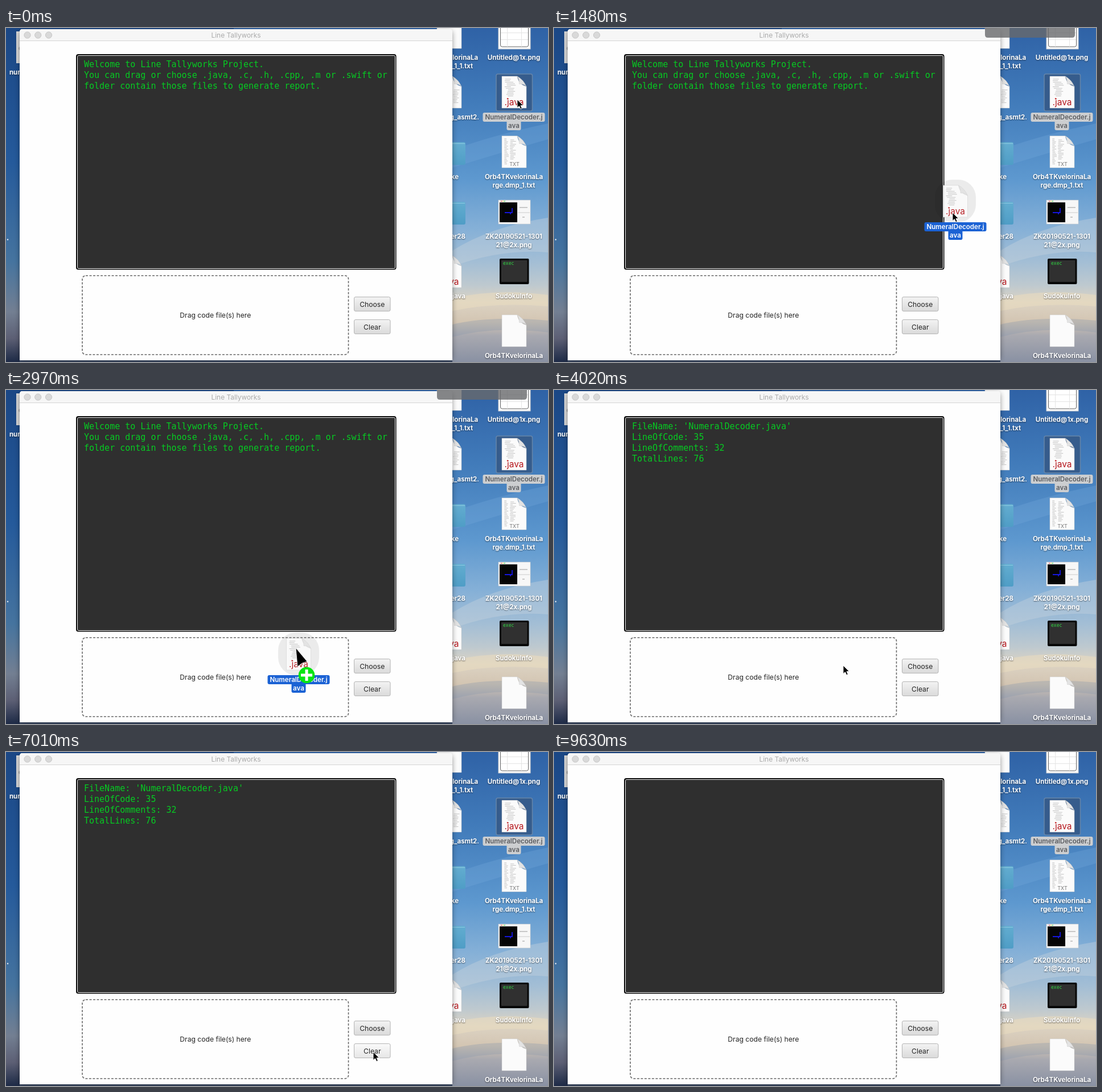
Write an HTML page that moves like this. It is 952x588 px and loops after 9.7 s.

```html
<!DOCTYPE html>
<html lang="en">
<head>
<meta charset="utf-8">
<title>Line Tallyworks</title>
<style>
html, body { margin: 0; width: 100%; height: 100%; overflow: hidden; background: #2c5f9f; }
svg { display: block; width: 952px; height: 588px; }
text { font-family: Inter, "Open Sans", sans-serif; white-space: pre; }
.label { font-size: 11.6px; font-weight: 600; fill: #fff; }
.ui { font-size: 12.15px; fill: #252525; text-anchor: middle; }
.mid { text-anchor: middle; }
.end { text-anchor: end; }
.console text { font: 15px "DejaVu Sans Mono", monospace; fill: #06cb22; }
</style>
</head>
<body>
<svg id="stage" viewBox="0 0 952 588">
  <defs>
    <linearGradient id="sky" x2="0" y2="1">
      <stop offset="0" stop-color="#2f62a6"/>
      <stop offset=".22" stop-color="#417bba"/>
      <stop offset=".45" stop-color="#5d98cf"/>
      <stop offset=".6" stop-color="#85b0d7"/>
      <stop offset=".7" stop-color="#a3bed5"/>
      <stop offset=".77" stop-color="#bec9cf"/>
      <stop offset=".82" stop-color="#dcd3c3"/>
      <stop offset=".88" stop-color="#d3c5b2"/>
      <stop offset=".92" stop-color="#a9a9b0"/>
      <stop offset="1" stop-color="#8991a3"/>
    </linearGradient>
    <linearGradient id="dusk" x2="0" y2="1">
      <stop offset="0" stop-color="#1b4785"/>
      <stop offset=".4" stop-color="#255a9b"/>
      <stop offset=".7" stop-color="#46749f"/>
      <stop offset=".85" stop-color="#737f92"/>
      <stop offset=".93" stop-color="#5c5f74"/>
      <stop offset="1" stop-color="#1d2a46"/>
    </linearGradient>
    <linearGradient id="bar" x2="0" y2="1">
      <stop offset="0" stop-color="#eaeaea"/><stop offset="1" stop-color="#d2d2d2"/>
    </linearGradient>
    <linearGradient id="btn" x2="0" y2="1">
      <stop offset="0" stop-color="#f3f3f3"/><stop offset="1" stop-color="#dadada"/>
    </linearGradient>
    <linearGradient id="btnHover" x2="0" y2="1">
      <stop offset="0" stop-color="#fafafa"/><stop offset="1" stop-color="#e6e6e6"/>
    </linearGradient>
    <linearGradient id="folder" x2="0" y2="1">
      <stop offset="0" stop-color="#63add0"/><stop offset="1" stop-color="#4f9dc6"/>
    </linearGradient>
    <filter id="soft" x="-20%" y="-20%" width="140%" height="140%"><feGaussianBlur stdDeviation="5"/></filter>
    <filter id="shade" x="-10%" y="-10%" width="120%" height="120%">
      <feDropShadow dx="0" dy="1" stdDeviation="1" flood-color="#001" flood-opacity=".65"/>
    </filter>
  </defs>
  <g id="desktop"></g>
  <g id="window"></g>
  <g id="overlay"></g>
</svg>
<script>
const LOOP = 9700, STEP = 149, START = 280;
const el = id => document.getElementById(id);
const lerp = (a, b, k) => a + (b - a) * k;

const rect = (x, y, w, h, fill, rx = 0, more = '') =>
  `<rect x="${x}" y="${y}" width="${w}" height="${h}" rx="${rx}" fill="${fill}" ${more}/>`;
const text = (s, x, y, cls, more = '') => `<text class="${cls}" x="${x}" y="${y}" ${more}>${s}</text>`;
const path = (d, fill, more = '') => `<path d="${d}" fill="${fill}" ${more}/>`;
const label = (lines, cx, y) => lines.map((s, i) => text(s, cx, y + i * 15, 'label mid')).join('');

function random(seed) {
  return () => (seed = seed * 16807 % 2147483647) / 2147483647;
}

// Faint rows of print on a document
function smallPrint(x, y, rows, gap, indent, length, seed) {
  const rnd = random(seed * 99991);
  let d = '';
  for (let i = 0; i < rows; i++) {
    const left = x + rnd() * indent, width = length * (0.4 + 0.6 * rnd());
    d += `M${left.toFixed(1)} ${(y + i * gap).toFixed(1)}h${width.toFixed(1)}`;
  }
  return path(d, 'none', 'stroke="#b3b3b3" stroke-width=".8"');
}

function sheet(x, y, inner = '') {
  return `<g transform="translate(${x} ${y})">` +
    path('M0 0H27Q29 14 43 18V56H0Z', '#fbfbfb', 'stroke="#c9c9c9" stroke-width=".5"') + inner +
    path('M27 0Q38 6 43 18Q39 13 30.500 13.500Q31 6 27 0Z', '#e3e3e3', 'stroke="#c4c4c4" stroke-width=".4"') + '</g>';
}

const suffix = text('.java', 21.5, 50.5, 'mid', 'font-size="15.500" fill="#b5161c"');

const javaSheet = (x, y) => sheet(x, y, smallPrint(5, 5, 12, 2.7, 6, 16, 41) +
  '<circle cx="10" cy="39.500" r="1.200" fill="#c33"/>' + suffix);

const txtSheet = (x, y) => sheet(x, y, smallPrint(4, 5, 18, 2.6, 0.5, 8, 7) + smallPrint(14, 7, 14, 2.6, 1, 11, 19) +
  text('TXT', 22, 52.5, 'mid', 'font-size="9" fill="#777"'));

// File name on coloured tags, below a sheet centred on cx
function tags(cx, y, back, ink) {
  return rect(cx - 54.5, y, 109, 16, back, 3) + rect(cx - 12.5, y + 14, 25, 17, back, 3) +
    text('NumeralDecoder.j', cx, y + 12, 'label mid', `style="fill:${ink}"`) +
    text('ava', cx, y + 27, 'label mid', `style="fill:${ink}"`);
}

const folder = y => path(`M750 ${y}H804Q807 ${y} 807 ${y + 3}V${y + 37}Q807 ${y + 40} 804 ${y + 40}H750Z`, 'url(#folder)') +
  rect(750, y + 2, 56, 1, '#8cc9e2');

function drawDesktop() {
  const clouds =
    path('M784 215Q850 190 952 168V196Q860 222 784 246Z', '#74a9da', 'opacity=".3"') +
    path('M784 392Q850 350 952 334V395Q870 388 784 420Z', '#c5d3dc', 'opacity=".4"') +
    path('M784 476Q860 458 952 470V490Q860 482 784 498Z', '#eadcc0', 'opacity=".6"') +
    path('M784 522Q850 506 952 515V536Q860 524 784 544Z', '#8b97ab', 'opacity=".35"');
  const icons =
    // right column
    rect(865, -12, 56, 49, '#fafafa', 0, 'stroke="#d5d5d5"') +
    rect(868.5, -8, 49, 41, '#fff', 3, 'stroke="#666"') +
    path('M869 8.500H917M869 20.500H917M880.500 0V33M905.500 0V33', 'none', 'stroke="#e4e4e4"') +
    rect(861, 81, 63.5, 65, '#365c8c', 3, 'stroke="#6685a9" stroke-width="1.500"') +
    javaSheet(871, 85) + txtSheet(871, 190) +
    rect(865, 303, 56, 42, '#f7f7f7', 0, 'stroke="#ccc" stroke-width=".6"') +
    rect(867, 307, 31, 35, '#050505') +
    path('M876 325H889V317M886 325V328', 'none', 'stroke="#1616df" stroke-width="1.800"') +
    path('M899 325H920', 'none', 'stroke="#ccc"') +
    path('M902 316H916M907 333H911', 'none', 'stroke="#999" stroke-width="1.200"') +
    '<circle cx="870" cy="305" r="1" fill="#f55"/><circle cx="873" cy="305" r="1" fill="#fb4"/><circle cx="876" cy="305" r="1" fill="#4c5"/>' +
    rect(867, 406, 51.5, 45, '#070707', 2) + rect(870, 409, 45.5, 38, '#303030', 1) +
    text('exec', 873, 417, '', 'style="font:8px \'DejaVu Sans Mono\',monospace" fill="#31d843"') +
    sheet(871, 505) +
    // column behind the window
    sheet(757, -20) + sheet(757, 85, smallPrint(28, 24, 9, 2.8, 2, 10, 5)) + folder(201) + folder(306) +
    sheet(757, 401, suffix) +
    rect(18, 6, 30, 56, '#d9d9d9') + '<circle cx="25" cy="36" r="3" fill="#aaa"/>';
  const names =
    label(['Untitled@1x.png'], 892, 56) +
    label(['Orb4TKvelorinaLa', 'rge.dmp_1.txt'], 892, 266) +
    label(['ZK20190521-1301', '21@2x.png'], 892, 371) +
    label(['SudokuInfo'], 892, 476) +
    label(['Orb4TKvelorinaLa'], 892, 581) +
    label(['Orb4TKvelorinaLa', 'rge.dmp_1_1.txt'], 778, 56) +
    text('prog_asmt2.', 831, 161, 'label end') +
    text('lake', 795, 266, 'label end') +
    text('folder28', 807, 371, 'label end') +
    text('main.java', 807, 476, 'label end') +
    text('numer', 6, 82, 'label');
  el('desktop').innerHTML =
    rect(0, 0, 952, 588, 'url(#sky)') + clouds + rect(0, 0, 400, 588, 'url(#dusk)') +
    rect(24, 584, 760, 4, '#3c4a64') + '<circle cx="3" cy="372.500" r="1.200" fill="#e8eef6"/>' +
    icons + `<g filter="url(#shade)">${names}</g>` + tags(892, 149, '#ccced0', '#5b5d61');
}

const button = (id, name, y) =>
  rect(611.5, y, 63.5, 25, 'url(#btn)', 2.5, `id="${id}" stroke="#b4b4b4"`) + text(name, 643.3, y + 17, 'ui');

function drawWindow() {
  const lights = [37.5, 56.2, 75].map(x => `<circle class="light" cx="${x}" cy="12.500" r="5.600"/>`).join('');
  el('window').innerHTML =
    rect(24, 5, 760, 580, '#000', 5, 'opacity=".4" filter="url(#soft)"') +
    path('M24 585V7Q24 2 29 2H779Q784 2 784 7V585Z', '#fefefe') +
    path('M24 22V7Q24 2 29 2H779Q784 2 784 7V22Z', '#f6f6f6', 'id="titleBar"') +
    rect(24, 22, 760, 1, '#d5d5d5', 0, 'id="titleLine"') + lights +
    text('Line Tallyworks', 404, 17, 'mid', 'id="title" font-size="11.900"') +
    rect(123, 46, 562.5, 379.5, '#050505', 4) +
    rect(125.5, 48.5, 558, 375, '#2f2f2f', 2, 'stroke="#f4f4f4"') +
    '<g class="console" id="console"></g>' +
    rect(134, 436, 467.5, 139, 'none', 6, 'stroke="#686868" stroke-width="1.600" stroke-dasharray="4 2.500"') +
    text('Drag code file(s) here', 367.8, 510.3, 'ui') +
    button('choose', 'Choose', 473.5) + button('clear', 'Clear', 513.5);
}

function drawOverlay() {
  const halo = rect(-36, -10, 72, 75, '#000', 31, 'opacity=".075"');
  el('overlay').innerHTML =
    path('M757 0H915V12Q915 17 910 17H762Q757 17 757 12Z', '#68696c', 'id="notch" opacity=".8"') +
    `<g id="ghost">${halo}<g opacity=".93">${javaSheet(-21.5, 0)}</g>${tags(0, 65, '#1b62d4', '#fff')}</g>` +
    `<g id="arrow">${path('M0 0V14.500L3.400 11.400L5.800 16.700L8.300 15.600L6 10.500H10.500Z', '#000', 'stroke="#fff" stroke-width=".9"')}</g>` +
    `<g id="copy">${path('M0 -31L20 -7L11 -4L3 2Z', '#000', 'stroke="#fff" stroke-width=".8"')}
      <circle cx="19" cy="17" r="14.300" fill="#08e512"/>
      ${path('M9 17H29M19 7V27', 'none', 'stroke="#fff" stroke-width="5"')}</g>`;
}

// Drag route: step, x, y
const drag = [[-1, 898, 126], [0, 893, 131], [7, 733, 299], [8, 700, 325], [12, 577, 406],
  [15, 532, 446], [18, 509, 485], [20, 504, 489]];
// Pointer after the drop: time, x, y
const moves = [[3870, 505, 486], [4020, 508, 485], [4170, 511, 483], [4320, 514, 482],
  [5510, 615, 501], [5660, 655, 512], [5810, 695, 523], [5960, 719, 528],
  [6710, 697, 528], [6860, 668, 528], [7010, 645, 528], [8190, 730, 530]];

function dragPoint(step) {
  let i = 1;
  while (i < drag.length - 1 && drag[i][0] < step) i++;
  const [s0, x0, y0] = drag[i - 1], [s1, x1, y1] = drag[i];
  const k = Math.min(1, (step - s0) / (s1 - s0));
  return [lerp(x0, x1, k), lerp(y0, y1, k)];
}

const welcome = ['Welcome to Line Tallyworks Project.',
  'You can drag or choose .java, .c, .h, .cpp, .m or .swift or',
  'folder contain those files to generate report.'];
const report = ["FileName: 'NumeralDecoder.java'", 'LineOfCode: 35', 'LineOfComments: 32', 'TotalLines: 76'];
const blank = [];

let shown = null;
function write(lines) {
  if (lines === shown) return;
  shown = lines;
  el('console').innerHTML = lines.map((s, i) => text(s, 137, 69.3 + i * 18.75, '')).join('');
}

const set = (id, name, value) => el(id).setAttribute(name, value);
const show = (id, on) => set(id, 'visibility', on ? 'visible' : 'hidden');
const place = (id, [x, y]) => set(id, 'transform', `translate(${x.toFixed(1)} ${y.toFixed(1)})`);

function render(t) {
  const step = t < 290 ? -1 : Math.floor((t - START) / STEP);
  const dropped = t >= 3870, active = t >= 7750 && t < 9630;
  const dragging = step >= 1 && !dropped, copying = dragging && step >= 16;
  const pos = dropped ? moves.filter(m => m[0] <= t).pop().slice(1) : dragPoint(Math.min(step, 20));

  place('arrow', pos);
  place('copy', pos);
  place('ghost', [pos[0] + 5, pos[1] - 48]);
  show('arrow', !copying && t < 8340);
  show('copy', copying);
  show('ghost', dragging);
  show('notch', step >= 2 && !dropped);

  write(!dropped ? welcome : t < 7900 ? report : blank);

  const hover = t >= 6860 && t < 8190, pressed = t >= 7750 && t < 7900;
  set('clear', 'fill', pressed ? '#d3d3d3' : hover ? 'url(#btnHover)' : 'url(#btn)');
  set('clear', 'stroke', active ? '#159fd2' : '#b4b4b4');
  set('clear', 'stroke-width', active ? 1.6 : 1);

  set('titleBar', 'fill', active ? 'url(#bar)' : '#f6f6f6');
  set('titleLine', 'fill', active ? '#b3b3b3' : '#d5d5d5');
  set('title', 'fill', active ? '#3f3f3f' : '#ababab');
  const hues = active ? ['#fc5650', '#fdbb2e', '#2bc63f'] : ['#d9d9d9', '#d9d9d9', '#d9d9d9'];
  document.querySelectorAll('.light').forEach((c, i) => {
    c.setAttribute('fill', hues[i]);
    c.setAttribute('stroke', active ? 'none' : '#c6c6c6');
  });
}

drawDesktop();
drawWindow();
drawOverlay();

const begin = performance.now();
function tick() {
  render((performance.now() - begin) % LOOP);
  requestAnimationFrame(tick);
}
render(0);
requestAnimationFrame(tick);
</script>
</body>
</html>
```
